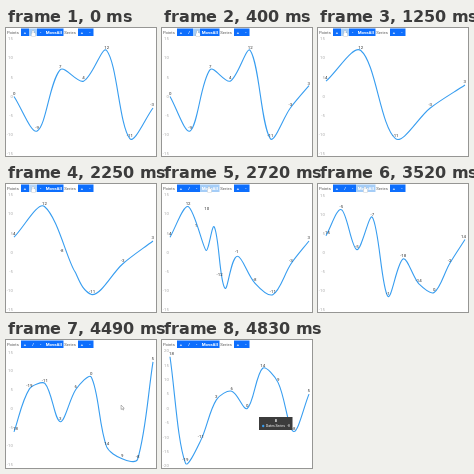
These frames come from a looping animation (150 by 128 pixels, 5.31 s). An HTML page with a canvas:

```html
<!DOCTYPE html>
<html lang="en">
<head>
<meta charset="utf-8">
<title>Spline chart</title>
<style>
html, body { margin: 0; width: 150px; height: 128px; overflow: hidden; background: #fff; }
canvas { display: block; width: 150px; height: 128px; }
</style>
</head>
<body>
<canvas id="stage"></canvas>
<script>
const LOOP = 5310, MID = 68.5, LEFT = 8, WIDTH = 139;
const BLUE = '#0d6efd', LINE = '#379df0';
const FONT = 'Roboto, Arial, "Liberation Sans", sans-serif';
const canvas = document.getElementById('stage');
const ctx = canvas.getContext('2d');
const ratio = window.devicePixelRatio || 1;
canvas.width = 150 * ratio;
canvas.height = 128 * ratio;
ctx.scale(ratio, ratio);

const insert = v => list => list.splice(2, 0, { v });
const moveAll = (...values) => list => values.forEach((v, i) => list[i].v = v);

// Each event edits the series and starts a transition towards the new layout.
const events = [
  { at: 40, span: 480, edit: list => list.push({ v: 3 }) },
  { at: 930, span: 320, edit: list => list.splice(0, 3) },
  { at: 2120, span: 340, edit: insert(-8) },
  { at: 2330, span: 340, edit: insert(-1) },
  { at: 2540, span: 340, edit: insert(-12) },
  { at: 2600, span: 340, edit: insert(10) },
  { at: 2660, span: 200, edit: insert(1) },
  { at: 3510, span: 410, range: 20, edit: moveAll(15, -5, -5, -7, -1, -18, -14, 0, -2, 14) },
  { at: 4050, span: 400, range: 15, edit: moveAll(-8, 7, 8, -4, 5, 9, -12, -15, -14, 13) },
  { at: 4475, span: 355, range: 20, edit: moveAll(18, -19, -11, 3, 6, 0, 14, 9, -8, 5) }
];

const mix = (a, b, k) => a + (b - a) * k;
const easeOut = k => 1 - (1 - k) ** 2;
const clamp = (k, low = 0, high = 1) => Math.max(low, Math.min(high, k));

function mixAll(from, to, k) {
  const out = {};
  for (const key in to) out[key] = mix(from[key], to[key], k);
  return out;
}

// Incoming and outgoing spline handles of b, scaled by the neighbouring segment lengths.
function handles(a, b, c) {
  const before = Math.hypot(b.x - a.x, b.y - a.y), after = Math.hypot(c.x - b.x, c.y - b.y);
  const k = before / (before + after), s = 0.65;
  const dx = (c.x - a.x) / 2 * s, dy = (c.y - a.y) / 2 * s;
  return { ix: b.x - dx * k, iy: b.y - dy * k, ox: b.x + dx * (1 - k), oy: b.y + dy * (1 - k) };
}

function place(list, unit) {
  const spots = list.map((p, i) => ({ x: LEFT + WIDTH * i / (list.length - 1), y: MID - p.v * unit }));
  list.forEach((p, i) => {
    const s = spots[i];
    p.to = { ...s, ...handles(spots[i - 1] || s, s, spots[i + 1] || s), lx: s.x, ly: s.y - 3 };
  });
}

function chartAt(time) {
  let list = [0, -9, 7, 4, 12, -11, -3].map(v => ({ v }));
  let from = 57.5 / 15, to = from, unit = from;
  place(list, unit);
  list.forEach(p => p.now = p.to);
  let last = null;
  const advance = t => {
    if (!last) return;
    const k = easeOut(clamp((t - last.at) / last.span));
    unit = mix(from, to, k);
    list.forEach(p => p.now = mixAll(p.from, p.to, k));
  };
  for (const e of events) {
    if (e.at > time) break;
    advance(e.at);
    const old = list.slice();
    e.edit(list);
    from = unit;
    if (e.range) to = 57.5 / e.range;
    place(list, to);
    list.forEach((p, i) => {
      if (p.now) { p.from = p.now; return; }
      // New points grow from the zero line, their labels from the previous label.
      const { x } = old[Math.min(i, old.length - 1)].now, { lx, ly } = list[i - 1].now;
      p.from = { x, y: MID, ix: x, iy: MID, ox: x, oy: MID, lx, ly };
    });
    last = e;
  }
  advance(time);
  return { list, unit };
}

function text(str, x, y, size, color, align = 'center', weight = 400) {
  ctx.font = `${weight} ${size}px ${FONT}`;
  ctx.fillStyle = color;
  ctx.textAlign = align;
  ctx.textBaseline = 'middle';
  ctx.fillText(str, x, y);
}

function drawChart({ list, unit }) {
  for (let v = -20; v <= 20; v += 5) {
    const y = MID - v * unit;
    if (y > 10 && y < 127) text(v, 6.8, y, 4.3, '#aaa', 'right');
  }
  const pts = list.map(p => p.now);
  ctx.beginPath();
  ctx.moveTo(pts[0].x, pts[0].y);
  for (let i = 1; i < pts.length; i++) {
    const a = pts[i - 1], b = pts[i];
    ctx.bezierCurveTo(a.ox, a.oy, b.ix, b.iy, b.x, b.y);
  }
  ctx.strokeStyle = LINE;
  ctx.lineWidth = 1.1;
  ctx.stroke();
  // Labels stay inside the plot area.
  for (const { v, now } of list) {
    ctx.font = `4.4px ${FONT}`;
    const half = ctx.measureText(v).width / 2;
    text(v, clamp(now.lx, 7 + half, 148 - half), now.ly, 4.4, '#333');
  }
}

const buttons = [
  ['+', 15, 8], ['/', 23, 8], ['-', 31, 7], ['MoveAll', 38, 19.5],
  ['+', 72, 8], ['-', 80, 7.5]
];

function hovered(t) {
  if (t < 300) return 1;
  if (t < 1100) return 2;
  if (t < 2680) return 1;
  return t < 4450 ? 3 : -1;
}

function drawToolbar(t) {
  const hover = hovered(t);
  const pressed = t >= 640 && t < 700;
  text('Points', 1, 4.6, 4.2, '#555', 'left');
  text('Series', 58.3, 4.6, 4.2, '#555', 'left');
  buttons.forEach(([label, x, w], i) => {
    ctx.fillStyle = i !== hover ? BLUE : pressed ? '#6ea8fe' : t > 1680 && i === 1 ? '#b4d4f8' : '#a5cdf7';
    ctx.fillRect(x, 0.5, w, 7.5);
    text(label, x + w / 2, 4.5, 4.4, '#fff', 'center', 700);
  });
}

function drawHand(x, y) {
  ctx.beginPath();
  ctx.roundRect(x - 0.7, y - 3, 1.4, 4, 0.7);
  ctx.roundRect(x - 1.5, y - 0.5, 4, 3.5, 1);
  ctx.strokeStyle = '#999';
  ctx.lineWidth = 0.5;
  ctx.stroke();
  ctx.fillStyle = '#fff';
  ctx.fill();
}

function drawArrow(x, y) {
  ctx.beginPath();
  [[0, 0], [0, 4.4], [1.1, 3.5], [1.9, 5], [2.6, 4.7], [1.9, 3.2], [3.2, 3.1]]
    .forEach(([dx, dy]) => ctx.lineTo(x + dx, y + dy));
  ctx.closePath();
  ctx.fillStyle = '#fff';
  ctx.fill();
  ctx.strokeStyle = '#777';
  ctx.lineWidth = 0.5;
  ctx.stroke();
}

function drawCursor(t) {
  const hover = hovered(t);
  if (hover >= 0) drawHand([0, 27, 35.5, 47][hover], 5.5);
  else if (t < 4630) {
    const k = clamp((t - 4490) / 140);
    drawArrow(mix(115, 128, k), mix(65, 80, k));
  }
}

function drawTooltip() {
  ctx.fillStyle = '#3c3c3c';
  ctx.fillRect(97, 77, 33.5, 13);
  text('8', 113.8, 80.4, 4, '#fff', 'center', 700);
  ctx.fillStyle = LINE;
  ctx.beginPath();
  ctx.arc(101.2, 86, 1.2, 0, 7);
  ctx.fill();
  text('Dates Series', 104, 86.1, 3.4, '#fff', 'left');
  text('-8', 128, 86.1, 3.4, '#fff', 'right');
}

function frame(now) {
  const t = now % LOOP;
  ctx.fillStyle = '#fff';
  ctx.fillRect(0, 0, 150, 128);
  drawChart(chartAt(t));
  drawToolbar(t);
  drawCursor(t);
  if (t >= 4630) drawTooltip();
  requestAnimationFrame(frame);
}
requestAnimationFrame(frame);
</script>
</body>
</html>
```
